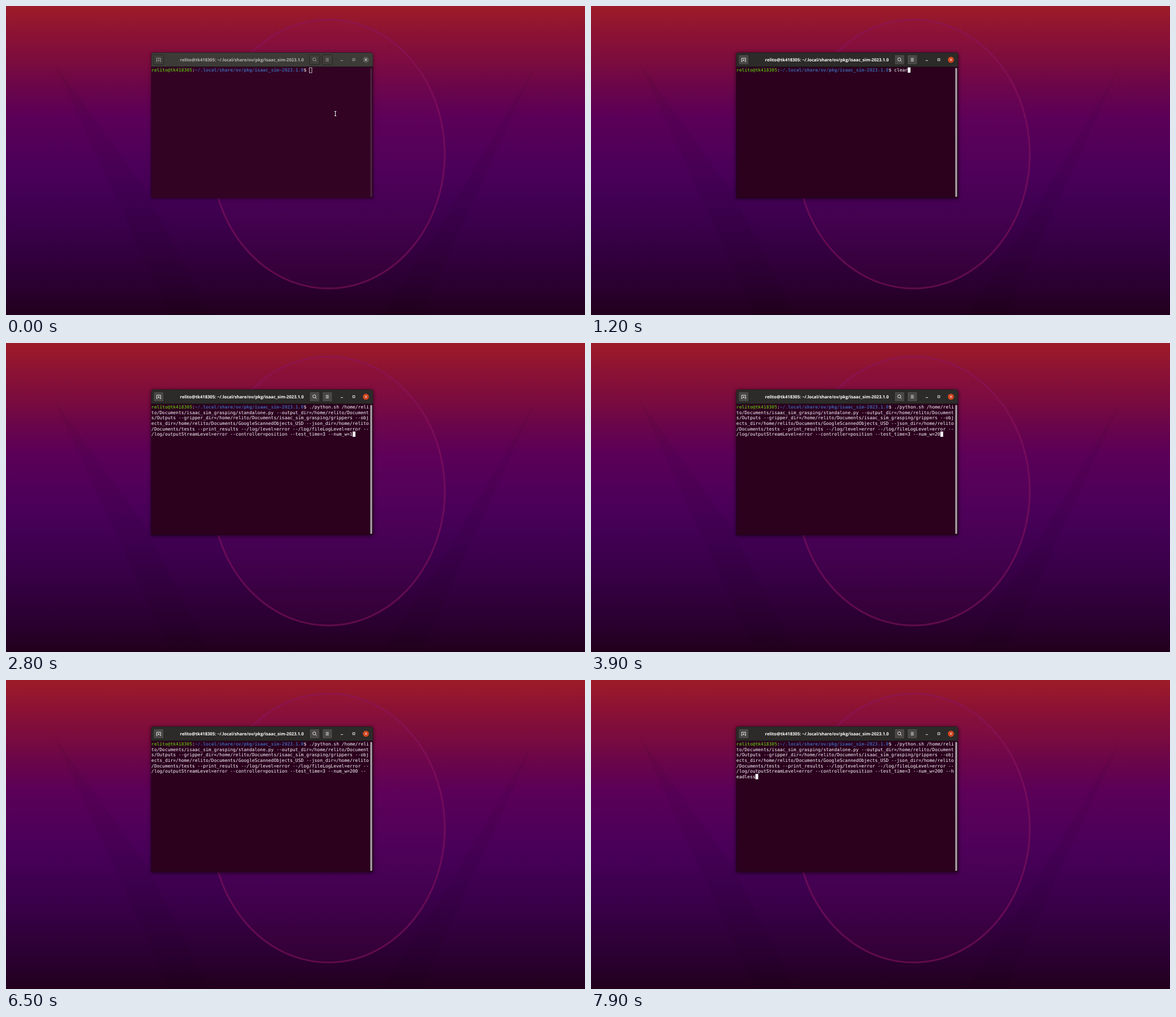
An HTML page for the animation above (8000 ms loop, 1024 by 547 pixels).

```html
<!DOCTYPE html>
<html lang="en">
<head>
<meta charset="utf-8">
<title>Terminal session</title>
<style>
  html, body { margin: 0; width: 100%; height: 100%; overflow: hidden; background: #22001c; }
  svg { display: block; width: 100vw; height: 100vh; }
  text { white-space: pre; text-rendering: geometricPrecision; }
  .term { font: 7.99px "DejaVu Sans Mono", monospace; fill: #fff; }
  .bold { font-weight: bold; }
  .title { font: bold 7.63px "Open Sans", sans-serif; text-anchor: middle; }
  .icon { fill: none; stroke-width: .9; }
</style>
</head>
<body>
<svg viewBox="0 0 1024 547" preserveAspectRatio="none">
  <defs>
    <linearGradient id="sky" x2="0" y2="1">
      <stop offset="0" stop-color="#9e1c28"/>
      <stop offset=".09" stop-color="#8c1234"/>
      <stop offset=".18" stop-color="#7b0c3e"/>
      <stop offset=".27" stop-color="#69054b"/>
      <stop offset=".36" stop-color="#5b0058"/>
      <stop offset=".46" stop-color="#510059"/>
      <stop offset=".55" stop-color="#490058"/>
      <stop offset=".64" stop-color="#400052"/>
      <stop offset=".73" stop-color="#390048"/>
      <stop offset=".91" stop-color="#29002f"/>
      <stop offset="1" stop-color="#22001c"/>
    </linearGradient>
    <filter id="blur" x="-10%" y="-10%" width="120%" height="120%">
      <feGaussianBlur stdDeviation="3"/>
    </filter>
  </defs>

  <rect width="1024" height="547" fill="url(#sky)"/>
  <g opacity=".05">
    <path d="M85 100L250 330L360 547H290Z"/>
    <path d="M939 100L774 380L664 547H734Z"/>
  </g>
  <ellipse cx="570" cy="262" rx="206" ry="238" fill="#8a1560" fill-opacity=".09"
           stroke="#8a1560" stroke-opacity=".55" stroke-width="3"/>

  <rect id="shadow" x="256" y="83" width="394" height="259" rx="4" filter="url(#blur)"/>
  <path id="bar" d="M257 108V87Q257 82.5 261.5 82.5H644.5Q649 82.5 649 87V108Z" stroke="#1d1b1a" stroke-width=".6"/>
  <rect id="body" x="257" y="107.5" width="392" height="232.5"/>
  <path d="M257 107.5H649" stroke="#1b1918" stroke-width=".8"/>
  <path d="M257.2 108V339.8H648.8V108" fill="none" stroke="#1d0716" stroke-width=".6"/>
  <rect id="scroll" x="644.3" y="109.5" width="3.2" height="228.5" rx="1.6"/>

  <g id="buttons" stroke="#201f1d" stroke-width=".8">
    <rect x="261" y="86.3" width="18" height="17.6" rx="2"/>
    <rect x="536.8" y="86.3" width="18" height="17.6" rx="2"/>
    <rect x="559.3" y="86.3" width="18" height="17.6" rx="2"/>
  </g>
  <g id="icons" class="icon">
    <path d="M266.6 98.4V92.4H273.4V98.4M266 98.4H267.6M272.4 98.4H274M268.3 96H271.7M270 94.3V97.7"/>
    <circle cx="545.2" cy="94.5" r="2.7"/>
    <path d="M547.2 96.5L549.4 98.7"/>
    <path d="M565.6 92.9H570.8M565.6 95.1H570.8M565.6 97.3H570.8"/>
  </g>
  <g id="controls" class="icon">
    <path d="M591.9 96.6H596"/>
    <rect x="613.3" y="93.2" width="3.6" height="3.6"/>
  </g>
  <circle id="close" cx="636.5" cy="95.1" r="5.4"/>
  <path class="icon" d="M634.7 93.3L638.3 96.9M638.3 93.3L634.7 96.9" stroke="#fff"/>
  <text id="title" class="title" x="417.2" y="97.8"></text>

  <g id="lines"></g>
  <rect id="caret" width="4.9" height="9.4"/>

  <g id="pointer" fill="none">
    <path d="M-1.7 -4H1.7M0 -4V4M-1.7 4H1.7" stroke="#17000f" stroke-width="2"/>
    <path d="M-1.7 -4H1.7M0 -4V4M-1.7 4H1.7" stroke="#fff" stroke-width="1"/>
  </g>
</svg>

<script>
const LOOP = 8000, COLS = 80, CELL = 4.81, LINE = 9.6, LEFT = 257.1, BASE = 116.1;
const user = "relito", login = user + "@tk418305";
const cwd = "~/.local/share/ov/pkg/isaac_sim-2023.1.0";
const prompt = `${login}:${cwd}$ `;
const docs = `/home/${user}/Documents`;
const command = `./python.sh ${docs}/isaac_sim_grasping/standalone.py --output_dir=${docs}/Outputs`
  + ` --gripper_dir=${docs}/isaac_sim_grasping/grippers --objects_dir=${docs}/GoogleScannedObjects_USD`
  + ` --json_dir=${docs}/tests --print_results --/log/level=error --/log/fileLogLevel=error`
  + ` --/log/outputStreamLevel=error --controller=position --test_time=3 --num_w=`;

// Each entry: start time and the input line from then on.
const edits = [[0, ""], [1200, "clear"]];
for (const [at, tail] of [
  [2000, "5"], [2500, ""], [2800, "1"], [3600, ""], [3700, "2"], [3900, "20"],
  [4400, "200"], [4900, "200 "], [5300, "200 -"], [5400, "200 --"],
  [6700, "200 --he"], [6900, "200 --hea"], [7000, "200 --head"], [7200, "200 --headl"],
  [7500, "200 --headle"], [7600, "200 --headles"], [7900, "200 --headless"]
]) edits.push([at, command + tail]);

const $ = id => document.getElementById(id);
const set = (node, attrs) => {
  for (const key in attrs) node.setAttribute(key, attrs[key]);
  return node;
};
const clamp = v => Math.max(0, Math.min(1, v));
const mix = (a, b, k) => `rgb(${a.map((v, i) => Math.round(v + (b[i] - v) * k))})`;
const within = (t, from, to) => t >= from && t < to;

function addText(col, row, content, cls = "", fill = "#fff") {
  const node = document.createElementNS("http://www.w3.org/2000/svg", "text");
  set(node, { x: LEFT + col * CELL, y: BASE + row * LINE, class: "term " + cls });
  node.style.fill = fill;
  node.textContent = content;
  return $("lines").appendChild(node);
}

$("title").textContent = `${login}: ${cwd}`;
addText(0, 0, login, "bold", "#58a112");
addText(login.length, 0, ":");
addText(login.length + 1, 0, cwd, "bold", "#3b61a8");
addText(prompt.length - 2, 0, "$");
const rows = Array.from({ length: 7 }, (_, i) => addText(i ? 0 : prompt.length, i, ""));

function drawInput(t) {
  const input = edits.filter(([at]) => at <= t).pop()[1];
  const full = prompt + input;
  rows.forEach((row, i) => {
    row.textContent = full.slice(i ? i * COLS : prompt.length, (i + 1) * COLS);
  });
  return full.length;
}

function drawCaret(t, pos, focused) {
  const inset = focused ? 0 : .5;
  set($("caret"), {
    x: LEFT + pos % COLS * CELL + inset,
    y: 108.7 + Math.floor(pos / COLS) * LINE + inset,
    width: 4.9 - inset,
    height: 9.4 - inset,
    fill: focused ? "#fff" : "none",
    stroke: focused ? "none" : "#e6dfe4",
    "stroke-width": .8,
    visibility: within(t, 3400, 3600) || within(t, 6500, 6700) ? "hidden" : "visible"
  });
}

function drawWindow(t, focused) {
  const glow = clamp((t - 400) / 300);
  const pick = (on, off) => focused ? on : off;
  set($("shadow"), { opacity: pick(.5, .3) });
  set($("bar"), { fill: pick("#2c2b29", "#3d3b38") });
  set($("body"), { fill: pick("#2b011e", "#330324") });
  set($("scroll"), { fill: pick("#aaa5a8", "#4b2440") });
  set($("close"), { fill: pick("#d0451f", "#5a5855") });
  set($("title"), { fill: pick("#fff", "#b5b3ae") });
  set($("controls"), { stroke: pick("#f0f0ee", "#aaa8a4") });
  set($("buttons"), { fill: focused ? mix([54, 53, 50], [74, 72, 70], glow) : "#403e3b" });
  set($("icons"), { stroke: focused ? mix([150, 148, 145], [245, 245, 243], glow) : "#a5a39f" });
}

function drawPointer(t) {
  const k = clamp(t / 400);
  const ease = k * k * (3 - 2 * k);
  set($("pointer"), {
    transform: `translate(${582.5 - 42.5 * ease} ${190.5 - 2.5 * ease})`,
    visibility: t < 1000 ? "visible" : "hidden"
  });
}

function draw(ms) {
  const t = Math.floor(ms % LOOP / 100) * 100;
  const focused = t >= 400;
  drawWindow(t, focused);
  drawCaret(t, drawInput(t), focused);
  drawPointer(t);
}

let start;
function tick(now) {
  start ??= now;
  draw(Math.max(0, now - start));
  requestAnimationFrame(tick);
}
draw(0);
requestAnimationFrame(tick);
</script>
</body>
</html>
```
